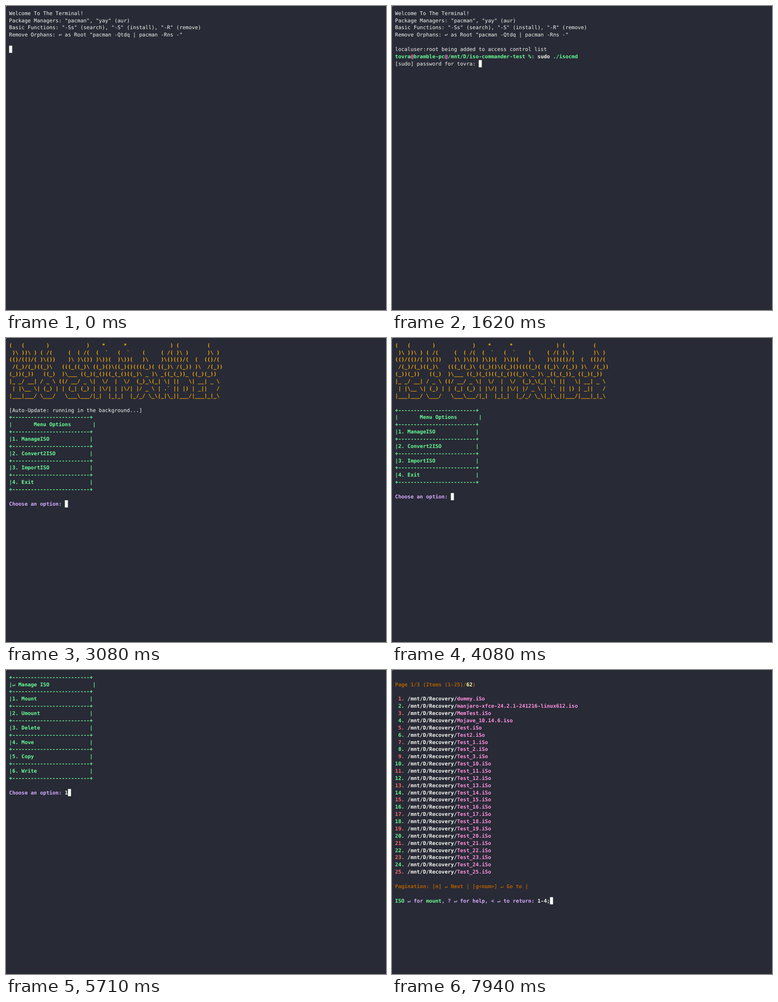
These frames come from a looping animation (837 by 669 pixels, 8 s). An HTML page:

```html
<!DOCTYPE html>
<html lang="en">
<head>
<meta charset="utf-8">
<title>Terminal session</title>
<style>
  html, body { margin: 0; width: 100%; height: 100%; overflow: hidden; background: #282a36; }
  svg { display: block; }
  text {
    font-family: "DejaVu Sans Mono", monospace;
    font-size: 11.33px;
    white-space: pre;
    text-rendering: geometricPrecision;
  }
</style>
</head>
<body>
<svg width="837" height="669" viewBox="0 0 837 669">
  <rect width="837" height="669" fill="#282a36"/>
  <path d="M0 0H1.6L0 1.6Z" fill="#fff"/>
  <g id="screen"></g>
</svg>
<script type="text/plain" id="logo">
(   (       )            )    *      *              ) (         (
 )\ ))\ ) ( /(     (  ( /(  (  `   (  `    (     ( /( )\ )      )\ )
(()/(()/( )\())    )\ )\()) )\))(  )\))(   )\    )\()(()/(  (  (()/(
 /(_)/(_)((_)\   (((_((_)\ ((_)()\((_)()((((_)( ((_)\ /(_)) )\  /(_))
(_))(_))   ((_)  )\___ ((_)(_()((_(_()((_)\ _ )\ _((_(_))_ ((_)(_))
|_ _/ __| / _ \ ((/ __/ _ \|  \/  |  \/  (_)_\(_| \| ||   \| __| _ \
 | |\__ \| (_) | | (_| (_) | |\/| | |\/| |/ _ \ | .` || |) | _||   /
|___|___/ \___/   \___\___/|_|  |_|_|  |_/_/ \_\|_|\_||___/|___|_|_\
</script>
<script>
const LOOP = 8000;
const CELL_W = 6.821, CELL_H = 15.87;
const LEFT = 6.82, TOP = 7.93, BASELINE = 11.75;
const BG = '#282a36', FG = '#f8f8f2', DIM = '#6272a4';

// Style codes used as {x} in lines; "block" paints the cell behind the text.
const STYLES = {
  t: { fill: FG },
  d: { fill: DIM },
  w: { fill: FG, bold: true },
  g: { fill: '#69ff94', bold: true },
  m: { fill: '#ff92df', bold: true },
  r: { fill: '#ff6e6e', bold: true },
  p: { fill: '#d6acff', bold: true },
  y: { fill: '#ffffa5', bold: true },
  o: { fill: '#ffaf00', bold: true },
  b: { fill: '#af5f00', bold: true },
  k: { fill: BG, block: FG },
  h: { fill: BG, block: DIM }
};
const CURSOR = '{k} ';

const logo = document.getElementById('logo').textContent
  .split('\n').slice(1, 9).map(line => '{o}' + line);

const welcome = [
  'Welcome To The Terminal!',
  'Package Managers: "pacman", "yay" (aur)',
  'Basic Functions: "-Ss" (search), "-S" (install), "-R" (remove)',
  'Remove Orphans: ↩ as Root "pacman -Qtdq | pacman -Rns -"',
  ''
];

function shell(input, ...rest) {
  return [
    ...welcome,
    'localuser:root being added to access control list',
    '{g}tovra{m}@{g}bramble-pc{m}@{g}/mnt/D/iso-commander-test %: ' + input,
    ...rest
  ];
}

// Typed part, cursor over the next letter, then the rest as a suggestion.
function suggest(count) {
  const cmd = 'sudo ./isocmd';
  const style = count < 4 ? '{r}' : '{w}';
  return shell(style + cmd.slice(0, count) + '{h}' + cmd[count] + '{d}' + cmd.slice(count + 1));
}

function menu(title, items, typed) {
  const border = '{g}+' + '-'.repeat(25) + '+';
  const lines = [border, '{g}|' + title.padEnd(26) + '|', border];
  items.forEach((item, i) => {
    lines.push('{g}|' + `${i + 1}. ${item}`.padEnd(25) + '|', border);
  });
  return [...lines, '', '{p}Choose an option: {w}' + typed + CURSOR];
}

const mainMenu = typed =>
  menu('       Menu Options', ['ManageISO', 'Convert2ISO', 'ImportISO', 'Exit'], typed);

const isoMenu = typed =>
  menu('↵ Manage ISO', ['Mount', 'Umount', 'Delete', 'Move', 'Copy', 'Write'], typed);

function isoList(typed) {
  const names = ['dummy.iSo', 'manjaro-xfce-24.2.1-241216-linux612.iso', 'MemTest.iSo',
    'Mojave_10.14.6.iso', 'Test.iSo', 'Test2.iSo'];
  for (let i = 1; i <= 25; i++) {
    if (i < 4 || i > 9) names.push(`Test_${i}.iSo`);
  }
  const rows = names.map((name, i) =>
    `{${i % 2 ? 'g' : 'r'}}${String(i + 1).padStart(2)}. {w}/mnt/D/Recovery/{m}${name}`);
  return [
    '', '{b}Page 1/3 (Items (1-25)/{y}62{b})', '',
    ...rows,
    '', '{b}Pagination: [n] ↵ Next | [g<num>] ↵ Go to |', '',
    '{g}ISO{p} ↵ for {g}mount{p}, ? ↵ for help, < ↵ to return: {w}' + typed + CURSOR
  ];
}

const entered = '{w}sudo {g}./isocmd';
const password = '[sudo] password for tovra: ';

const timeline = [
  [0, [...welcome, CURSOR]],
  [100, shell(CURSOR)],
  [610, suggest(1)],
  [760, suggest(2)],
  [850, suggest(3)],
  [940, suggest(4)],
  [1330, shell(entered + CURSOR)],
  [1580, shell(entered, CURSOR)],
  [1620, shell(entered, password + CURSOR)],
  [3050, shell(entered, password, CURSOR)],
  [3080, [...logo, '', '[Auto-Update: running in the background...]', ...mainMenu('')]],
  [4080, [...logo, '', ...mainMenu('')]],
  [4680, [...logo, '', ...mainMenu('1')]],
  [4880, isoMenu('')],
  [5710, isoMenu('1')],
  [5910, isoList('')],
  [7070, isoList('1')],
  [7490, isoList('1-')],
  [7670, isoList('1-4')],
  [7940, isoList('1-4;')]
];

const screen = document.getElementById('screen');

function add(tag, attrs, content) {
  const el = document.createElementNS('http://www.w3.org/2000/svg', tag);
  for (const key in attrs) el.setAttribute(key, attrs[key]);
  if (content) el.textContent = content;
  screen.appendChild(el);
}

function drawLine(line, row) {
  const parts = line.split(/\{(\w)\}/);
  const y = TOP + row * CELL_H;
  let col = 0;
  for (let i = 0; i < parts.length; i += 2) {
    const run = parts[i];
    const style = STYLES[i ? parts[i - 1] : 't'];
    const x = LEFT + col * CELL_W;
    if (style.block) {
      add('rect', { x, y, width: run.length * CELL_W, height: CELL_H, fill: style.block });
    }
    if (run.trim()) {
      add('text', { x, y: y + BASELINE, fill: style.fill, 'font-weight': style.bold ? 700 : 400 }, run);
    }
    col += run.length;
  }
}

let shown = -1;

function render(time) {
  let index = timeline.length - 1;
  while (timeline[index][0] > time) index--;
  if (index === shown) return;
  shown = index;
  screen.replaceChildren();
  timeline[index][1].forEach(drawLine);
}

const start = performance.now();

function tick() {
  render((performance.now() - start) % LOOP);
  requestAnimationFrame(tick);
}
tick();
</script>
</body>
</html>
```
